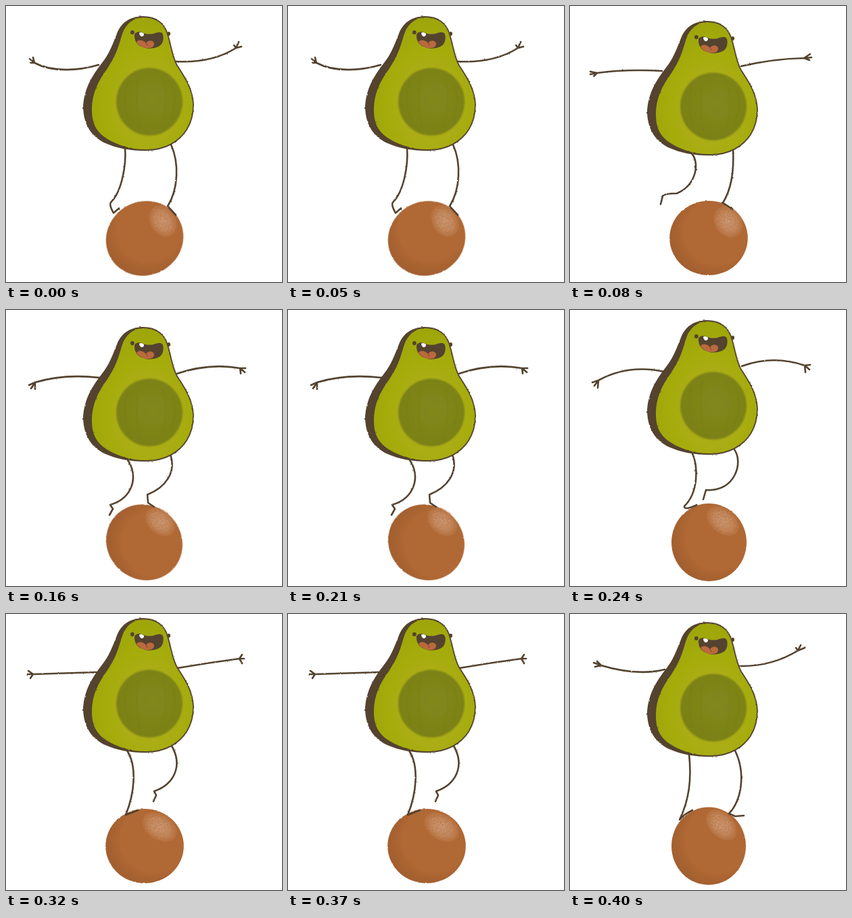
These frames come from a looping animation (408 by 408 pixels, 480 ms). An HTML page:

```html
<!DOCTYPE html>
<html lang="en">
<head>
<meta charset="utf-8">
<title>Avocado balancing on its stone</title>
<style>
  html, body { margin: 0; width: 100%; height: 100%; overflow: hidden; background: #fff; }
  svg { display: block; width: 100vw; height: 100vh; overflow: hidden; }
  /* six poses side by side, moved one stage width per step */
  .strip { animation: run 480ms steps(6) infinite; }
  @keyframes run { to { transform: translateX(-2448px); } }
  .limbs { fill: none; stroke: #54432f; stroke-width: 2.6; stroke-linecap: round; stroke-linejoin: round; filter: url(#rough); }
  .ball { fill: url(#stone); filter: url(#rough); }
  .shine { fill: url(#light); filter: url(#speckle); }
</style>
</head>
<body>
<svg viewBox="0 0 408 408">
  <defs>
    <radialGradient id="flesh" cx=".56" cy=".66" r=".66">
      <stop offset=".45" stop-color="#aaad14"/>
      <stop offset=".62" stop-color="#a5ac0b"/>
      <stop offset="1" stop-color="#9da509"/>
    </radialGradient>
    <radialGradient id="pit" cx=".54" cy=".46" r=".54">
      <stop offset="0" stop-color="#83881b"/>
      <stop offset="1" stop-color="#7c8118"/>
    </radialGradient>
    <radialGradient id="stone" cx=".62" cy=".42" r=".62">
      <stop offset=".7" stop-color="#b06834"/>
      <stop offset=".84" stop-color="#a86331"/>
      <stop offset="1" stop-color="#a35f30"/>
    </radialGradient>
    <radialGradient id="light">
      <stop offset="0" stop-color="#d0a080"/>
      <stop offset=".6" stop-color="#cb966f" stop-opacity=".85"/>
      <stop offset="1" stop-color="#c3875b" stop-opacity=".35"/>
    </radialGradient>
    <filter id="rough" color-interpolation-filters="sRGB">
      <feTurbulence type="fractalNoise" baseFrequency=".3" numOctaves="1" seed="4"/>
      <feDisplacementMap in="SourceGraphic" scale="2.2" xChannelSelector="R" yChannelSelector="G"/>
    </filter>
    <filter id="speckle" color-interpolation-filters="sRGB">
      <feTurbulence type="fractalNoise" baseFrequency=".7" numOctaves="2" seed="9"/>
      <feColorMatrix values="0 0 0 0 0  0 0 0 0 0  0 0 0 0 0  2 0 0 0 -.25"/>
      <feComposite in="SourceGraphic" operator="in"/>
    </filter>
    <filter id="soft"><feGaussianBlur stdDeviation="1.2"/></filter>

    <g id="body">
      <g filter="url(#rough)">
        <path fill="#54432f" d="M203 15C182 16 172 24 165 38C158 56 152 72 142 84C128 102 115 122 114 150C115 178 128 193 145 202C165 211 185 214 207 214L240 120Z"/>
        <path fill="url(#flesh)" stroke="#54432f" stroke-width="1.8" d="M203 16C187 16 175 27 170 44C165 62 160 76 149 92C136 110 126 128 126 153C126 173 132 184 143 193C156 203 180 213 207 213C236 213 256 200 267 183C275 170 277 157 277 146C276 122 264 105 253 88C246 76 244 58 239 42C234 24 220 16 203 16Z"/>
      </g>
      <ellipse cx="212" cy="141.500" rx="49" ry="50" fill="url(#pit)" filter="url(#soft)"/>
      <path fill="none" stroke="#6f7617" stroke-width="2" opacity=".16" d="M180 112Q172 142 182 172M196 104Q189 142 198 180M232 106Q242 142 229 179M246 118Q254 142 243 168"/>
      <g fill="#54432f">
        <circle cx="186.800" cy="39" r="2.900"/>
        <ellipse cx="240.500" cy="41" rx="2.500" ry="2.900"/>
        <path d="M190 45C189 39 195 37 201 39C207 42 212 42 218 41C224 39 230 37 232 42C234 50 231 58 225 60C219 63 209 64 203 61C195 59 190 52 190 45Z"/>
      </g>
      <path fill="#bb693e" d="M193 53C196 49 203 50 207 55C210 50 217 50 219 55C219 59 217 61 213 62C204 63 196 59 193 53Z"/>
      <path fill="none" stroke="#7d4a2e" d="M207 54L209 59"/>
      <path fill="#fff" d="M197 39.500Q201 38 204 41Q204 45.500 200 45Q197 43 197 39.500Z"/>
    </g>
  </defs>

  <g class="strip">
    <g>
      <ellipse class="ball" cx="205" cy="343.500" rx="58" ry="54.500" transform="rotate(-28 205 343.500)"/>
      <ellipse class="shine" cx="232" cy="318" rx="19" ry="25" transform="rotate(-30 232 318)"/>
      <g class="limbs">
        <path d="M137 87C110 95 70 99 42 84M35 78L42 84L36 84M42 84L40 76"/>
        <path d="M251 82C288 84 318 76 340 62M348 60L340 62L337 58M340 62L344 53"/>
        <path d="M176 210C178 235 171 275 155 290Q152 294 159 306L167 299"/>
        <path d="M244 205C256 232 255 270 239 296L251 309"/>
      </g>
      <use href="#body"/>
    </g>

    <g transform="translate(408)">
      <ellipse class="ball" cx="205" cy="343" rx="57.800" ry="55"/>
      <ellipse class="shine" cx="234" cy="319" rx="20" ry="25" transform="rotate(-35 234 319)"/>
      <g class="limbs">
        <path d="M136 96Q84 93 40 99M30 97L40 99L30 101M40 99L35 104"/>
        <path d="M253 89Q300 78 346 77M355 71L346 77L357 76M346 77L354 80"/>
        <path d="M179 217C192 230 188 264 158 277Q140 277 137 281L134 293"/>
        <path d="M241 212C243 250 236 275 226 291L240 300"/>
      </g>
      <use href="#body" y="7"/>
    </g>

    <g transform="translate(816)">
      <ellipse class="ball" cx="204.500" cy="343.500" rx="58" ry="54.500" transform="rotate(42 204.500 343.500)"/>
      <ellipse class="shine" cx="228" cy="313" rx="18" ry="25" transform="rotate(-48 228 313)"/>
      <g class="limbs">
        <path d="M138 100Q86 94 43 107M34 111L43 107L37 116M43 107L43 117"/>
        <path d="M253 94Q300 78 346 86M354 86L346 86L353 92M346 86L347 94"/>
        <path d="M180 222C196 245 188 278 154 288L158 294L153 303"/>
        <path d="M243 214C252 240 236 262 209 273L210 285L219 291"/>
      </g>
      <use href="#body" y="10"/>
    </g>

    <g transform="translate(1224)">
      <ellipse class="ball" cx="205.500" cy="343.500" rx="55.500" ry="57.500"/>
      <ellipse class="shine" cx="226" cy="312" rx="18" ry="27" transform="rotate(-52 226 312)"/>
      <g class="limbs">
        <path d="M138 91Q86 80 42 104M33 107L42 104L36 112M42 104L41 115"/>
        <path d="M254 83Q300 66 347 82M355 81L347 82L354 88M347 82L348 92"/>
        <path d="M180 210C190 230 190 270 169 290Q168 297 188 288"/>
        <path d="M242 205C258 225 243 270 201 266L197 280"/>
      </g>
      <use href="#body"/>
    </g>

    <g transform="translate(1632)">
      <ellipse class="ball" cx="205" cy="343" rx="57.800" ry="55"/>
      <ellipse class="shine" cx="227" cy="315" rx="19" ry="28" transform="rotate(-58 227 315)"/>
      <g class="limbs">
        <path d="M134 86L40 89M33 84L40 89L32 89M40 89L36 95"/>
        <path d="M253 80Q300 72 345 66M349 60L345 66L352 66M345 66L349 73"/>
        <path d="M179 202C194 225 190 265 177 297L195 290"/>
        <path d="M245 195C262 225 248 252 219 262L222 268L218 277"/>
      </g>
      <use href="#body" y="-9"/>
    </g>

    <g transform="translate(2040)">
      <ellipse class="ball" cx="205" cy="343" rx="55" ry="57.500"/>
      <ellipse class="shine" cx="224" cy="312" rx="18" ry="27" transform="rotate(-45 224 312)"/>
      <g class="limbs">
        <path d="M140 82Q100 92 46 76M35 72L46 76L37 78M46 76L40 70"/>
        <path d="M250 77Q298 78 337 54M341 46L337 54L347 50M337 54L334 50"/>
        <path d="M176 207C180 245 176 275 162 304Q167 297 181 290"/>
        <path d="M244 202C260 235 254 275 235 295L244 299L257 298"/>
      </g>
      <use href="#body" y="-3"/>
    </g>
  </g>
</svg>
</body>
</html>
```
